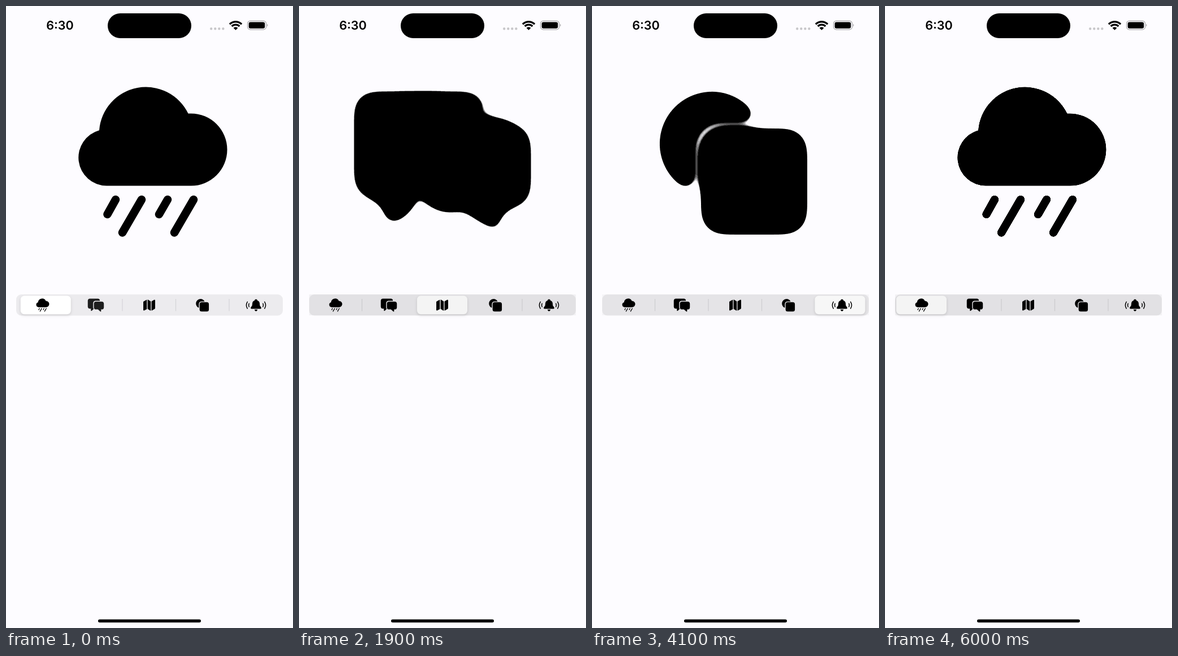
These frames come from a looping animation (508x1102 px, 6.5 s). An HTML page:

```html
<!DOCTYPE html>
<html lang="en">
<head>
<meta charset="utf-8">
<title>Morphing icons</title>
<style>
  html, body { margin: 0; width: 100%; height: 100%; overflow: hidden; background: #fdfcff; }
  svg { display: block; width: 100%; height: 100%; }
  .line { fill: none; stroke: #000; stroke-linecap: round; }
  #incoming { mix-blend-mode: plus-lighter; }
  #knob { filter: drop-shadow(0 2px 2.5px rgba(0, 0, 0, .13)); }
</style>
</head>
<body>
<svg viewBox="0 0 508 1102">
  <defs>
    <!-- Blur followed by a hard alpha threshold melts the shapes together -->
    <filter id="melt" filterUnits="userSpaceOnUse" x="0" y="70" width="508" height="420">
      <feGaussianBlur id="blur" stdDeviation="0"/>
      <feComponentTransfer><feFuncA id="threshold" type="linear" slope="1" intercept="0"/></feComponentTransfer>
    </filter>

    <g id="icon0">
      <path d="M178 318.5A50 50 0 0 1 165 220.3A83 83 0 0 1 322.5 190.5H327.5A64 64 0 0 1 327.5 318.5Z"/>
      <path class="line" stroke-width="14.5" d="M194 343L179.5 369M240 343L206 401.5M286 343L271 369M332 343L298 401.5"/>
    </g>
    <g id="icon1">
      <path d="M133 145H295C320 145 337 160 337 188H254C219 188 199 208 199 243V318C199 335 203 346 211 353.5L178 384C172 389 169 392 163 392.5C157 392 154 388 154 382V347H133C107 347 91 331 91 304V187C91 161 107 145 133 145Z"/>
      <path d="M257 204H375C401 204 417 220 417 246V321C417 347 401 363 375 363H361V398C361 404 357 408 351 408.5C346 408 343 406 338 401L296 363H257C231 363 215 347 215 321V246C215 220 231 204 257 204Z"/>
    </g>
    <g id="icon2">
      <path d="M134 213C134 205 137 202 144 198L200 167Q205.5 164 205.5 171V350Q205.5 356 201 359L158 383C146 389 134 386 134 371Z"/>
      <path d="M221 170Q221 162 228 166L280 197Q285 200 285 206V382Q285 390 278 387L226 358Q221 355 221 349Z"/>
      <path d="M300 205Q300 199 305 196L350 171C362 165 374 167 374 182V338C374 346 371 350 365 354L308 385Q300 390 300 381Z"/>
    </g>
    <g id="icon3">
      <path d="M294.5 201H234C199 201 177 223 177 258V330.2A93 93 0 1 1 294.5 201Z"/>
      <path d="M234 217H340C366 217 381 232 381 258V364C381 390 366 405 340 405H234C208 405 193 390 193 364V258C193 232 208 217 234 217Z"/>
    </g>
    <g id="waves" class="line" stroke-width="17">
      <path d="M113 243Q97 277 113 311M80 209Q36 277 80 345"/>
    </g>
    <g id="icon4">
      <path d="M166 351C152 351 146 343 147 333C148 318 163 308 171 295C178 283 178 262 180 240C183 207 199 188 226 181C228 165 239 155 254 155C269 155 280 165 282 181C309 188 325 207 328 240C330 262 330 283 337 295C345 308 360 318 361 333C362 343 356 351 342 351Z"/>
      <path d="M225 366H283C282 386 270 399 254 399S226 386 225 366Z"/>
      <use href="#waves"/>
      <use href="#waves" transform="translate(508) scale(-1 1)"/>
    </g>
  </defs>

  <rect width="508" height="1102" fill="#fdfcff"/>

  <text x="95.5" y="42.3" text-anchor="middle" font-family="Inter, sans-serif" font-weight="600" font-size="21.6">6:30</text>
  <rect x="180" y="13" width="148" height="44" rx="22"/>
  <path d="M363.2 40.2h21.5" stroke="#c8c7ca" stroke-width="4.4" stroke-linecap="round" stroke-dasharray="0 7.05"/>
  <path d="M395.9 32.2A15.2 15.2 0 0 1 417.1 32.2M399.7 36A9.6 9.6 0 0 1 413.3 36" fill="none" stroke="#000" stroke-width="3.3"/>
  <path d="M406.5 42.8l-4-4a5.7 5.7 0 0 1 8 0z"/>
  <rect x="427.5" y="26.3" width="33" height="15.6" rx="5" fill="none" stroke="#a9a8ab" stroke-width="1.2"/>
  <rect x="429.6" y="28.4" width="28.6" height="11.4" rx="3.2"/>
  <path d="M462 31.6Q465 34 462 36.8Z" fill="#a9a8ab"/>
  <rect x="163" y="1086.8" width="182" height="5.4" rx="2.7"/>

  <g filter="url(#melt)">
    <use id="outgoing"/>
    <use id="incoming"/>
  </g>

  <rect x="18" y="511" width="472" height="37.5" rx="9" fill="#ecebee"/>
  <g id="dividers" stroke="#d4d3d7" stroke-width="1.2"></g>
  <rect id="knob" y="513.3" width="89" height="33" rx="7" fill="#fff"/>
  <g id="segments"></g>
  <rect id="shade" x="18" y="511" width="472" height="37"/>
</svg>
<script>
  const LOOP = 6500, FRAME = 100;
  const HALF_MORPH = 400, MAX_BLUR = 20;
  const SEGMENT = 94.5, COUNT = 5;

  // Each tap: span on screen, last moving frame, and when morph and knob begin (ms)
  const taps = [
    { begin: 0,    last: 900,  morph: 50,   knob: -16 },
    { begin: 1300, last: 2200, morph: 1400, knob: 1350 },
    { begin: 2700, last: 3500, morph: 2600, knob: 2653 },
    { begin: 3900, last: 4600, morph: 3850, knob: 3896 },
    { begin: 5200, last: 6000, morph: 5215, knob: 5230 },
  ];

  const byId = id => document.getElementById(id);
  const clamp = v => Math.min(1, Math.max(0, v));
  const set = (el, attrs) => {
    for (const name in attrs) el.setAttribute(name, attrs[name]);
    return el;
  };
  const add = (parent, tag, attrs) =>
    parent.appendChild(set(document.createElementNS('http://www.w3.org/2000/svg', tag), attrs));

  const segments = [], dividers = [];
  for (let i = 0; i < COUNT; i++) {
    segments.push(add(byId('segments'), 'use', {
      href: '#icon' + i,
      transform: `translate(${64.5 + SEGMENT * i} 530) scale(.0873) translate(-254 -276.5)`,
    }));
    if (i) dividers.push(add(byId('dividers'), 'path', { d: `M${17 + SEGMENT * i} 519v21.5` }));
  }

  const easeInOut = v => v * v * (3 - 2 * v);

  function knobProgress(ms) {
    const x = Math.max(0, ms) * .025;
    return 1 - (1 + x) * Math.exp(-x);
  }

  // Spring with response 0.7 s and damping fraction 0.8
  function fadeProgress(ms) {
    if (ms <= 0) return 0;
    const x = 2 * Math.PI / 700 * ms;
    return clamp(1 - Math.exp(-.8 * x) * (Math.cos(.6 * x) + .8 / .6 * Math.sin(.6 * x)));
  }

  function drawMorph(from, to, ms) {
    const sigma = MAX_BLUR * clamp(1 - Math.abs(ms / HALF_MORPH - 1));
    const slope = Math.max(1, 2.5 * sigma);
    const fade = fadeProgress(ms - HALF_MORPH);
    set(byId('blur'), { stdDeviation: sigma });
    set(byId('threshold'), { slope, intercept: .5 - .5 * slope });
    set(byId('outgoing'), { href: '#icon' + from, opacity: 1 - fade });
    set(byId('incoming'), { href: '#icon' + to, opacity: fade });
    set(byId('shade'), { opacity: .045 * easeInOut(clamp(ms / 400)) });
  }

  function drawControl(from, to, ms) {
    const p = knobProgress(ms);
    set(byId('knob'), { x: 20 + SEGMENT * (from + (to - from) * p) });
    const shown = (divider, selected) => divider === selected || divider === selected - 1 ? 0 : 1;
    dividers.forEach((el, i) => set(el, { opacity: shown(i, from) * (1 - p) + shown(i, to) * p }));
    const press = ms >= 0 ? .15 * clamp(1 - ms / 100) : 0;
    segments.forEach((el, i) => set(el, { opacity: i === to ? 1 - press : 1 }));
  }

  function draw(now) {
    const time = Math.floor(now % LOOP / FRAME) * FRAME;
    const from = taps.findLastIndex(tap => time >= tap.begin);
    const to = (from + 1) % COUNT;
    const tap = taps[from];
    const t = Math.min(time, tap.last);
    drawMorph(from, to, t - tap.morph);
    drawControl(from, to, t - tap.knob);
  }

  const start = performance.now();
  function tick() {
    draw(performance.now() - start);
    requestAnimationFrame(tick);
  }
  tick();
</script>
</body>
</html>
```
